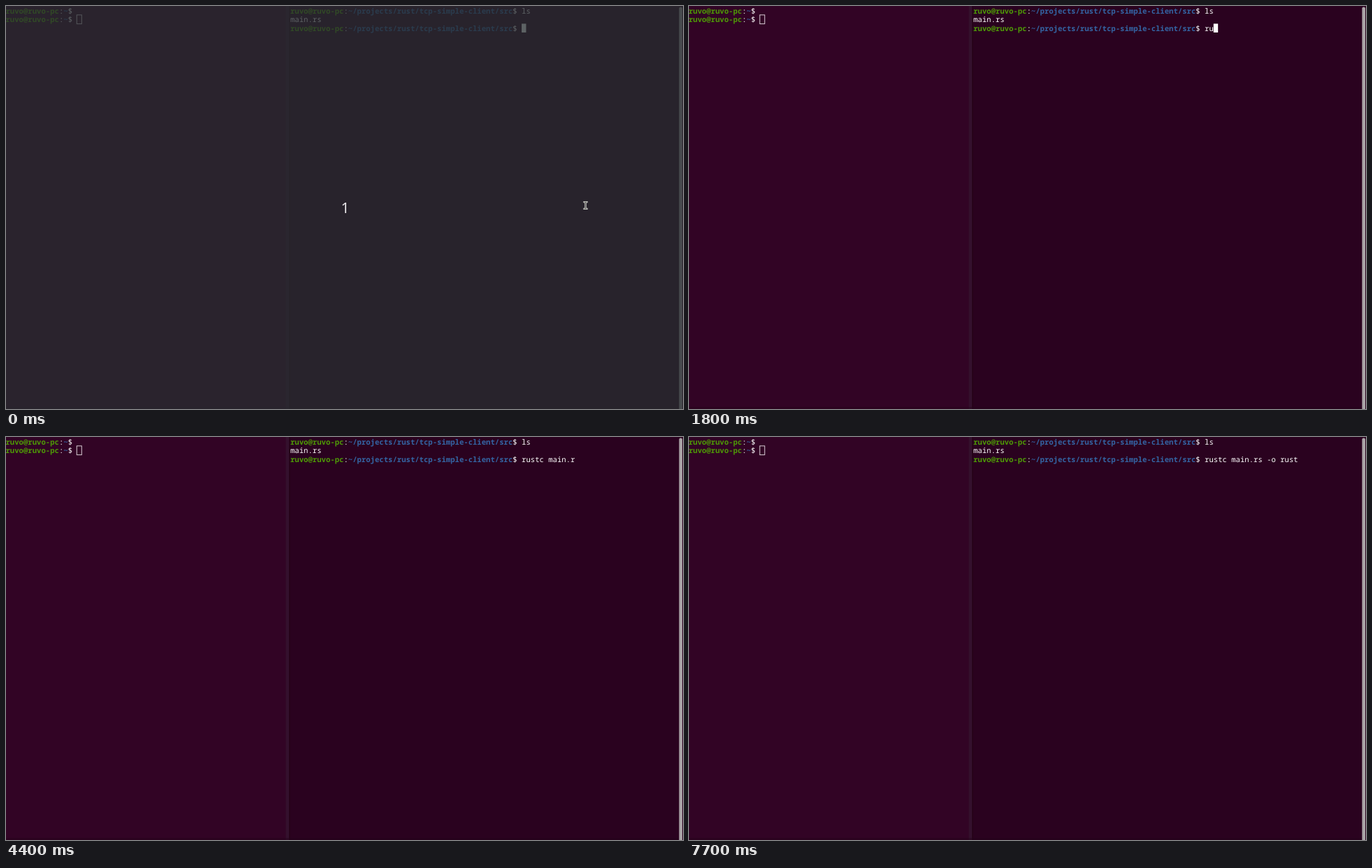
Animation of 969x578 px, one loop 8 s. Source, as an HTML page:

```html
<!DOCTYPE html>
<html lang="en">
<head>
<meta charset="utf-8">
<title>Terminal session</title>
<style>
  html, body { margin: 0; width: 100%; height: 100%; overflow: hidden; background: #2a021f; }
  svg { display: block; width: 100%; height: 100%; }
  text { font: 10.61px "Noto Sans Mono", "DejaVu Sans Mono", monospace; fill: #fff; white-space: pre; text-rendering: geometricPrecision; }
  .user, .path { font-weight: 700; }
  .user { fill: #4e9a06; }
  .path { fill: #3465a4; }
  #count { font: 21px "Noto Sans", "Open Sans", sans-serif; fill: #e4e2e4; text-anchor: middle; }
</style>
</head>
<body>
<svg viewBox="0 0 969 578" preserveAspectRatio="none">
  <rect width="969" height="578" fill="#2a021f"/>
  <rect width="401" height="578" fill="#320425"/>
  <rect x="400.5" width="4.5" height="578" fill="#34112d"/>
  <rect x="405" width="2" height="578" fill="#260319"/>
  <rect y="575" width="963" height="3" fill="#22031a" opacity=".45"/>
  <rect x="963.4" y="1.5" width="4.6" height="580" rx="2" fill="#aaa4a7"/>
  <g id="lines"></g>
  <rect x="101.3" y="12.8" width="7" height="12.8" fill="none" stroke="#d8ccd4"/>
  <text id="typed"></text>
  <rect id="caret" width="6.4" height="12.6" fill="#fff"/>
  <g id="countdown">
    <rect width="969" height="578" fill="#272e31" opacity=".75"/>
    <text id="count" x="485.5" y="297">1</text>
  </g>
  <g id="mouse" fill="none">
    <path d="M-3-4.9h6M-3 4.9h6M0-4.9v9.8" stroke="#f2f2ee" stroke-width="2.2"/>
    <path d="M-2.4-4.9h4.8M-2.4 4.9h4.8M0-4.9v9.8" stroke="#20221c" stroke-width=".7"/>
  </g>
</svg>
<script>
const LOOP = 8000, CELL = 6.366, ROW = 12.7;
const LEFT = -0.5, RIGHT = 407, INPUT = RIGHT + 52 * CELL;
const DIR = "~/projects/rust/tcp-simple-client/src";

const KEY_GAP = 100, BLINK_ON = 600, BLINK_OFF = 200;
const MOVE_END = 400;

// Start time of each burst of typing
const bursts = {
  1700: "ru", 2000: "stc", 2400: " ", 2900: "m", 3100: "ain",
  3700: ".r", 5000: "s ", 5900: "-o ", 6800: "rust"
};
const keys = Object.entries(bursts).flatMap(([time, text]) =>
  [...text].map((char, i) => ({ char, time: +time + i * KEY_GAP })));

const $ = id => document.getElementById(id);
const baseline = row => row * ROW + 10.5;
const mix = (a, b, p) => a + (b - a) * p;

function addLine(x, row, html) {
  $("lines").insertAdjacentHTML("beforeend", `<text x="${x}" y="${baseline(row)}">${html}</text>`);
}
const prompt = (dir, command = "") =>
  `<tspan class="user">ruvo@ruvo-pc</tspan>:<tspan class="path">${dir}</tspan>$ ${command}`;

addLine(LEFT, 0, prompt("~"));
addLine(LEFT, 1, prompt("~"));
addLine(RIGHT, 0, prompt(DIR, "ls"));
addLine(RIGHT, 1, "main.rs");
addLine(RIGHT, 2, prompt(DIR));

$("typed").setAttribute("x", INPUT);
$("typed").setAttribute("y", baseline(2));
$("caret").setAttribute("y", 2 * ROW);

function show(id, on) {
  $(id).style.display = on ? "" : "none";
}

function draw(time) {
  const t = Math.floor(time / 100) * 100; // the screen refreshes ten times a second
  const typed = keys.filter(key => key.time <= t);
  $("typed").textContent = typed.map(key => key.char).join("");
  $("caret").setAttribute("x", INPUT + typed.length * CELL);

  // Each key press restarts the blink
  const idle = t - (typed.length ? typed[typed.length - 1].time : MOVE_END);
  show("caret", idle % (BLINK_ON + BLINK_OFF) < BLINK_ON);

  const p = Math.min(t / MOVE_END, 1) ** 1.5;
  $("mouse").setAttribute("transform", `translate(${mix(829.5, 806, p)} ${mix(286, 251, p)})`);
  show("mouse", !typed.length);
  show("countdown", t < 100);
}

const start = performance.now();
function tick() {
  draw((performance.now() - start) % LOOP);
  requestAnimationFrame(tick);
}
tick();
</script>
</body>
</html>
```
